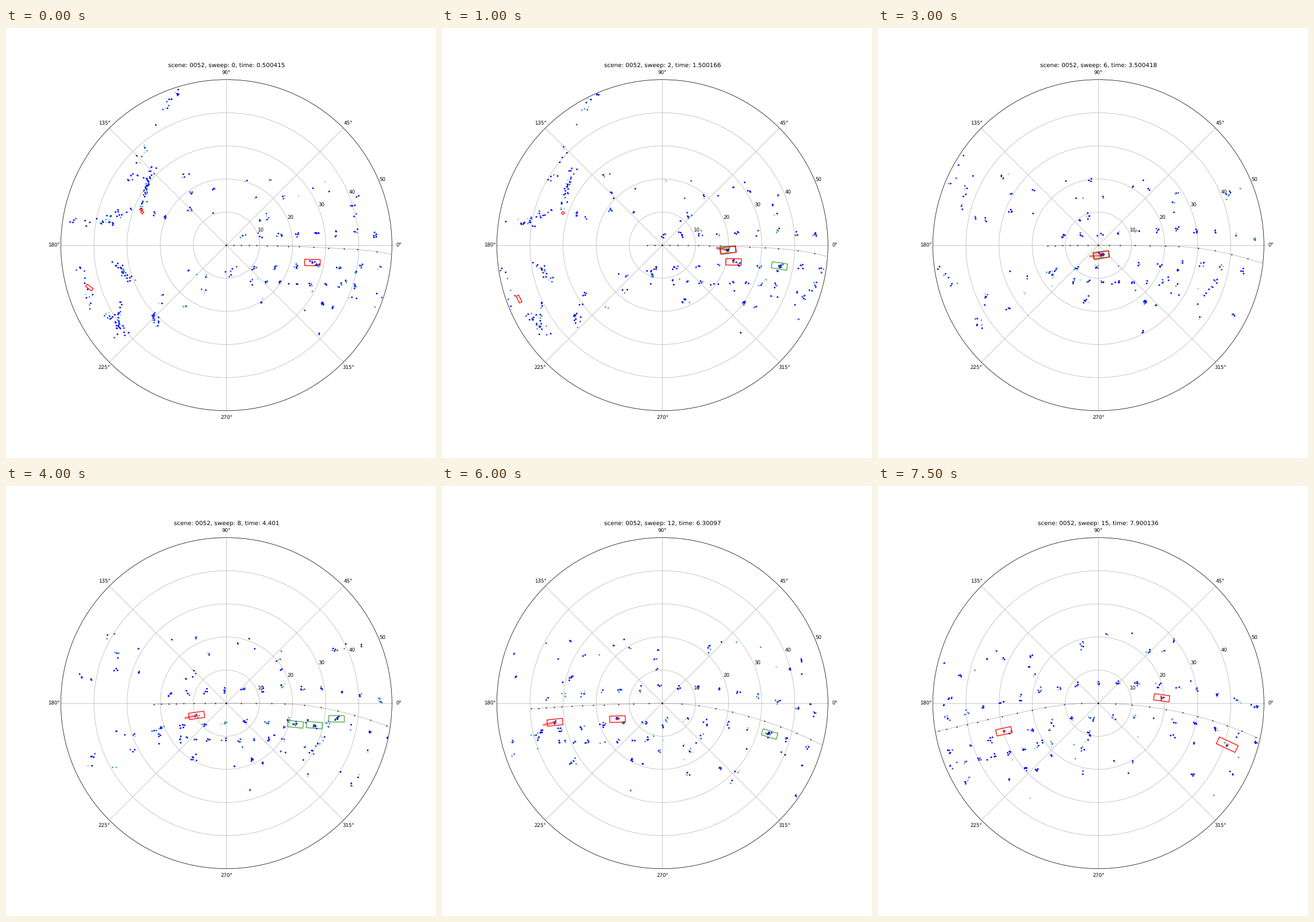
A matplotlib script that plays this animation: 748 px wide and 748 px high, repeating every 8000 ms.

```python
import numpy as np
import matplotlib.pyplot as plt
from matplotlib.animation import FuncAnimation
from matplotlib.collections import LineCollection
from matplotlib.patches import Circle

plt.rcParams["text.hinting"] = "none"

SIZE = 748
HUB = complex(0.5125 * SIZE, 0.505 * SIZE)
RADIUS = 0.385 * SIZE
TIMES = [0.500415, 1.000291, 1.500166, 2.000336, 2.500507, 3.000462, 3.500418, 4.000573,
         4.401, 4.901163, 5.401327, 5.901148, 6.30097, 6.900692, 7.400414, 7.900136]
DOT_COLORS = np.array([[0, 0, 1, 1], [.08, .25, .85, .9], [.2, .58, .62, .85], [.5, .83, .7, .8]])
INK = {"r": (1, 0, 0, 1), "g": (0, .5, 0, .75)}
CAR, CART, WALKER = (27, 11), (13, 5), (4, 4)

# ego path in px, x forward and y down, from keyed step lengths and chord angles
step = np.arange(28)
STEPS = np.interp(step, [0, 3, 4, 7, 8, 10, 11, 12, 13, 19, 20],
                  [13, 13.2, 18, 19, 25.5, 27, 23, 34, 29.5, 29.5, 27])
CHORDS = np.radians(np.interp(step, [0, 4, 8, 10, 11, 12, 14, 28],
                              [.1, 1.2, 2.4, 2.7, 3.4, 6.5, 14, 47.6]))
PATH = np.r_[0, np.cumsum(STEPS * np.exp(1j * CHORDS))]
ARC = np.r_[0, np.cumsum(STEPS)]
HEADING = np.r_[0, 0.7 * CHORDS[:-1] + 0.3 * CHORDS[1:], CHORDS[-1]]

# facades around the start, as seen in sweep 0: x0, y0, x1, y1, count
WALLS = [(253, 245, 236, 308, 42), (240, 207, 213, 275, 16), (165, 338, 222, 312, 24),
         (106, 340, 190, 338, 14), (188, 405, 216, 440, 30), (198, 472, 192, 545, 22),
         (172, 495, 212, 530, 24), (257, 497, 262, 519, 18), (300, 105, 246, 185, 16),
         (126, 404, 150, 490, 14)]
# rows beside the road: first and last arc length, gap, offset, drift, returns
ROWS = [(27, 640, 32.7, -14, -.06, 6), (12, 640, 37.2, 42, -.055, 6), (45, 230, 26, 63, 0, 5)]
# lone objects, as seen in sweep 0: x, y, returns
LANDMARKS = [(324, 289, 6), (321, 316, 6), (391, 429, 6), (275, 464, 5), (348, 430, 4),
             (260, 323, 5), (455, 326, 8), (562, 286, 3), (550, 479, 6), (570, 487, 6),
             (654, 471, 6), (448, 476, 8), (700, 297, 7), (545, 533, 3)]

# standing objects: first and last sweep, place and angle when first seen, size, ink
OBJECTS = [
    (0, 3, 533, 408, 1, CAR, "r"), (2, 3, 587, 414, 9, CAR, "g"),
    (8, 9, 503.5, 414.5, 6, CAR, "g"), (8, 11, 536.5, 416, 5, CAR, "g"),
    (8, 9, 574.5, 404.5, 0, CAR, "g"), (10, 11, 581.5, 431, 7, CAR, "g"),
    (10, 11, 634, 414.5, 25, CAR, "r"), (10, 15, 354.5, 403.5, 0, CAR, "r"),
    (12, 13, 570, 431.5, 17, CAR, "g"), (15, 15, 493.5, 368.5, 8, CAR, "r"),
    (15, 15, 607.5, 450, 25, (36, 13), "r"), (0, 1, 145, 451.5, 38, CART, "r"),
    (2, 3, 134, 471.5, 63, CART, "r"), (0, 1, 235, 315.5, 40, WALKER, "r"),
    (0, 3, 237, 320.5, 40, WALKER, "r"),
]

# oncoming car: sweep, x, y, angle
ONCOMING = np.array([(2, 498, 386.5, -8), (4, 446, 391.5, -13), (8, 331.5, 399, -8),
                     (10, 261.5, 400.5, -5), (12, 196.5, 411, -6), (13, 160, 419, -9)])


def to_world(z, k):
    return PATH[k] + (z - HUB) * np.exp(1j * HEADING[k])


def to_screen(world, k):
    return HUB + (world - PATH[k]) * np.exp(-1j * HEADING[k])


def roadside(s, offset):
    """World point at arc length s, offset px to the right of the path."""
    x = np.interp(s, ARC, PATH.real) + min(s, 0)
    y = np.interp(s, ARC, PATH.imag)
    return complex(x, y) + 1j * offset * np.exp(1j * np.interp(s, ARC, HEADING))


def inside(z):
    return np.abs(z - HUB) < RADIUS - 1


def xy(z):
    return np.column_stack([z.real, z.imag])


def blur(rng, n, sigma):
    return (rng.normal(size=n) + 1j * rng.normal(size=n)) * sigma


def cluster(rng, mid, n):
    return mid + blur(rng, n, 1.2 + 0.2 * n)


def build_world():
    rng = np.random.default_rng(52)
    walls = []
    for x0, y0, x1, y1, n in WALLS:
        t = rng.random(n)
        line = complex(x0, y0) * (1 - t) + complex(x1, y1) * t
        walls.append(to_world(line + blur(rng, n, 3.5), 0))
    street = [cluster(rng, to_world(complex(x, y), 0), n) for x, y, n in LANDMARKS]
    for first, last, gap, offset, drift, n in ROWS:
        for s in np.arange(first, last, gap):
            street.append(cluster(rng, roadside(s, offset + drift * s), n))
    for _ in range(70):
        offset = rng.choice([-1, 1]) * rng.uniform(40, 125)
        mid = roadside(rng.uniform(-120, 680), offset)
        street.append(cluster(rng, mid, rng.integers(1, 5)))
    return np.concatenate(walls), np.concatenate(street)


WALL_DOTS, STREET_DOTS = build_world()


def returns(k, cars):
    """Radar returns of sweep k."""
    rng = np.random.default_rng(k)
    walls = WALL_DOTS[rng.random(len(WALL_DOTS)) < 1 - k / 8]
    street = STREET_DOTS[rng.random(len(STREET_DOTS)) < 0.75]
    z = to_screen(np.r_[walls, street], k)
    z = np.concatenate([z + blur(rng, len(z), 0.8)] + [cluster(rng, c, 5) for c in cars])
    z = z[inside(z)]
    return z, DOT_COLORS[rng.choice(4, len(z), p=[.55, .17, .15, .13])]


def rect(mid, angle, length, width):
    corners = np.array([-1 - 1j, 1 - 1j, 1 + 1j, -1 + 1j, -1 - 1j])
    corners = corners.real * length / 2 + 1j * corners.imag * width / 2
    return xy(mid + corners * np.exp(1j * angle))


def boxes(k):
    """Centre, angle, size and ink of every box in sweep k."""
    found = []
    for first, last, x, y, angle, size, ink in OBJECTS:
        if first <= k <= last:
            mid = to_screen(to_world(complex(x, y), first), k)
            turn = HEADING[first] - HEADING[k]
            found.append((mid, np.radians(angle) + turn, size, ink))
    if ONCOMING[0, 0] <= k <= ONCOMING[-1, 0]:
        x, y, angle = [np.interp(k, ONCOMING[:, 0], col) for col in ONCOMING.T[1:]]
        angle = np.radians(angle)
        if k <= 6:
            found.append((complex(x - 1, y - 1), angle / 2, CAR, "g"))
        found.append((complex(x, y), angle, CAR, "r"))
    return [box for box in found if inside(box[0])]


fig = plt.figure(figsize=(12, 12), dpi=SIZE / 12, facecolor="white")
polar = fig.add_subplot(projection="polar")
polar.set_rlim(0, 50)
polar.set_rticks(range(10, 51, 10))
title = polar.set_title("")

px = fig.add_axes([0, 0, 1, 1])
px.set(xlim=(0, SIZE), ylim=(SIZE, 0))
px.axis("off")
disc = Circle((HUB.real, HUB.imag), RADIUS, transform=px.transData)
route, = px.plot([], [], "--", color=".35", lw=.6)
route.set_clip_path(disc)
dots = px.scatter([], [], s=11, linewidths=0, zorder=3)
trail, = px.plot([], [], lw=4.5, alpha=.5, solid_capstyle="butt", zorder=4)
stops, = px.plot([], [], "ks", ms=2, mew=0, zorder=5)
px.plot(HUB.real, HUB.imag, "ks", ms=3.2, mew=0, zorder=5)
frames = LineCollection([], linewidths=1.5, zorder=6)
cores = LineCollection([], linewidths=.8, zorder=6)
px.add_collection(frames, autolim=False)
px.add_collection(cores, autolim=False)


def draw(k):
    title.set_text(f"scene: 0052, sweep: {k}, time: {TIMES[k]}")

    path = to_screen(PATH, k)
    route.set_data(path.real, path.imag)
    near = path[inside(path)]
    stops.set_data(near.real, near.imag)

    found = boxes(k)
    frames.set_segments([rect(mid, angle, *size) for mid, angle, size, _ in found])
    frames.set_color([INK[ink] for *_, ink in found])
    cars = [box for box in found if box[2][0] >= CAR[0]]
    cores.set_segments([rect(mid, angle, 3, 3) for mid, angle, *_ in cars])
    cores.set_color(["r" if ink == "r" else "k" for *_, ink in cars])

    z, colors = returns(k, [mid for mid, *_ in cars])
    dots.set_offsets(xy(z))
    dots.set_facecolors(colors)

    trail.set_data([], [])
    if ONCOMING[0, 0] <= k <= ONCOMING[-1, 0]:
        mid = found[-1][0]
        trail.set_data([mid.real - 21, mid.real], [mid.imag + np.interp(k, [2, 8], [-4, 5]), mid.imag])
        trail.set_color("#800000" if k < 6 else "red")
    return []


anim = FuncAnimation(fig, draw, frames=len(TIMES), interval=500, repeat=True)
plt.show()
```
